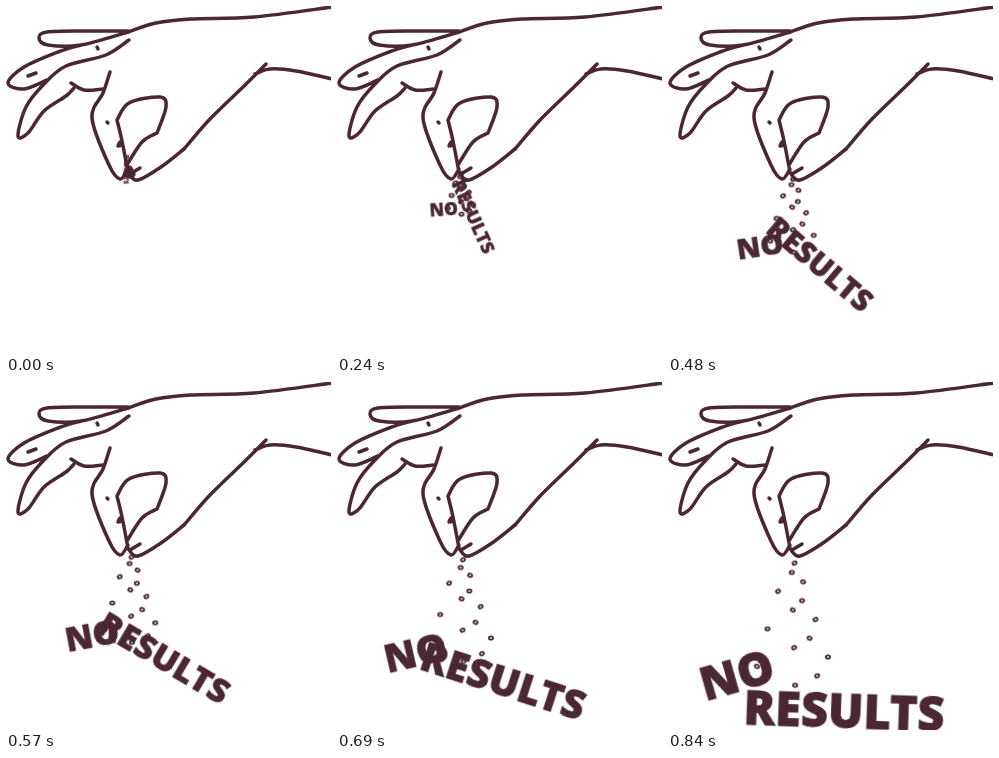
Write an HTML page that moves like this. It is 325 by 348 pixels and loops after 0.87 s.

```html
<!DOCTYPE html>
<html lang="en">
<head>
<meta charset="utf-8">
<title>No results</title>
<style>
  html, body { margin: 0; width: 100%; height: 100%; overflow: hidden; background: #fff; }
  svg { display: block; width: 325px; height: 348px; }
  #hand, #dots { fill: none; stroke: #4b2831; stroke-linecap: round; stroke-linejoin: round; }
  #hand { stroke-width: 3.5; }
  #dots { stroke-width: 1.8; }
  text {
    font: 800 46px "Open Sans", "Noto Sans", sans-serif; text-anchor: middle;
    fill: #4b2831; stroke: #4b2831; stroke-width: .8;
  }
</style>
</head>
<body>
<svg viewBox="0 0 325 348">
  <g id="hand"></g>
  <g id="dots"></g>
  <text id="no" y="16.4">NO</text>
  <text id="results" y="16.4">RESULTS</text>
</svg>
<script>
  const $ = id => document.getElementById(id);
  const add = (parent, tag, attrs) => {
    const el = document.createElementNS('http://www.w3.org/2000/svg', tag);
    for (const key in attrs) el.setAttribute(key, attrs[key]);
    return parent.appendChild(el);
  };

  // Smooth curve through a few points (Catmull-Rom as Béziers).
  const curve = points => {
    const p = points.split(' ').map(s => s.split(',').map(Number));
    const at = i => p[Math.max(0, Math.min(p.length - 1, i))];
    const lean = (i, dir) => at(i).map((v, k) => v + dir * (at(i + 1)[k] - at(i - 1)[k]) / 6);
    return `M${p[0]}` + p.slice(1).map((end, i) =>
      `C${lean(i, 1)} ${lean(i + 1, -1)} ${end}`).join('');
  };
  const draw = (...lines) => add($('hand'), 'path', { d: lines.map(curve).join('') });

  // Arm
  draw('326,1 248,11 185,13 150,17 122,26',
       '326,73 290,65 264,63 249,68',
       '260,58 238,80 204,113 178,143');
  // Outer fingers
  draw('122,25 80,25 41,26 33,32 42,39 75,39 122,26',
       '75,39 52,46 18,61 2,77 18,83 41,74',
       '123,34 100,49 60,60 38,78 20,101 12,130 22,127 38,105 60,90 68,82',
       '65,77 78,84 96,83', '22,70 30,67');
  // Index finger and thumb
  draw('104,66 97,87 86,112 103,159 114,173 122,163',
       '122,166 116,135 111,114',
       '111,114 123,97 154,91 160,101 151,127',
       '151,127 136,136 121,159',
       '123,168 132,174 155,161 178,143', '124,168 134,162');
  draw('114,136 112,140 116,139', '91,41 92,43', '101,116 102,117');

  const timing = { duration: 870, iterations: Infinity, easing: 'steps(29, jump-none)' };
  const pose = (x, y, turn = 0, size = 1) =>
    `translate(${x}px, ${y}px) rotate(${turn}deg) scale(${size})`;
  const move = (el, from, to) =>
    el.animate([{ transform: pose(...from) }, { transform: pose(...to) }], timing);

  move($('no'), [122, 168, 1, .13], [69, 293.5, -16, 1]);
  move($('results'), [120, 163.5, 91, .15], [176, 329.5, 2, 1.02]);

  // Grains fall in four lanes of a cone that opens from the fingertips.
  const lanes = [.2, .03, .33, -.28];
  for (let i = 0; i < 14; i++) {
    const drop = 18 + 9.4 * i;
    const side = lanes[i % 4] * drop;
    const turn = i % 3 * 25 - 25;
    const dot = add($('dots'), 'ellipse', { rx: 2.1, ry: 1.7 });
    move(dot, [123 + side * .1, 161 + drop * .065, turn], [123 + side, 163 + drop, turn]);
  }
</script>
</body>
</html>
```
